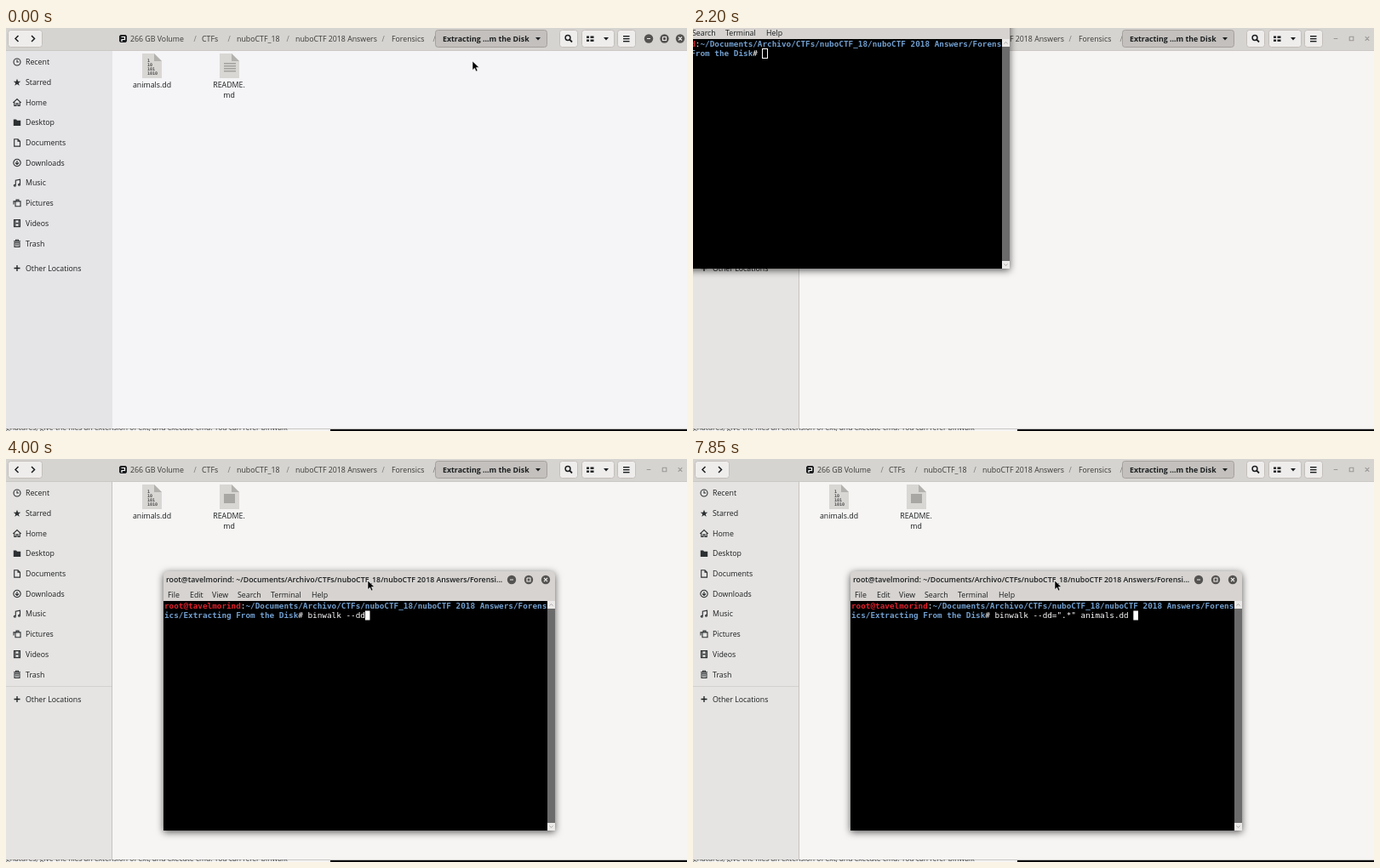
An HTML page with a canvas for the animation above (8000 ms loop, 800 by 474 pixels).

```html
<!DOCTYPE html>
<html lang="en">
<head>
<meta charset="utf-8">
<title>Opening a terminal from the file manager</title>
<style>
  html, body { margin: 0; width: 100%; height: 100%; overflow: hidden; background: #f6f5f4; }
  canvas { display: block; }
</style>
</head>
<body>
<canvas id="stage" width="800" height="474"></canvas>
<script>
const ctx = document.getElementById('stage').getContext('2d');
const LOOP = 8000;
const UI = '"Open Sans", "Noto Sans", sans-serif';
const MONO = '"DejaVu Sans Mono", monospace';
const INK = '#1b1e1f';

const PLACE = ['nuboCTF_18', 'nuboCTF 2018 Answers'];
const USER = 'root@tavelmorind';
const PATH = `~/Documents/Archivo/CTFs/${PLACE.join('/')}/Forens`;

// Tracks are [time, x, y]
const POINTER = [[400, 548, 39], [850, 495, 161], [1150, 495, 161], [1350, 531, 220],
                 [1450, 535, 240], [1550, 535, 240], [1850, 151, -14]];
const DRAG = [[2200, -273, -154], [2300, -12, -1], [2400, 0, 0]];
const SETTLED = 100, MENU_OPEN = 1000, MENU_CLOSE = 1500, TERM_OPEN = 1600, FOCUS = 2500;

// Keystrokes; "<" is backspace
const KEYS = [[2750, 'b'], [2850, 'i'], [2900, 'n'], [3000, 'w'], [3100, 'a'], [3200, 'l'],
  [3300, 'k'], [3350, ' '], [3500, '-'], [3600, '-'], [3650, 'd'], [3750, 'd'], [4400, '='],
  [4900, '.'], [5150, '*'], [5600, '<'], [5750, '<'], [6000, '"'], [6400, '.'], [6600, '*'],
  [6800, '"'], [7000, ' '], [7200, 'a'], [7400, 'n'], [7700, 'i'], [7850, 'mals.dd ']];

const SIDEBAR = [
  ['Recent', 'M9 5a4 4 0 1 1-8 0a4 4 0 1 1 8 0M5 2.5V5H7'],
  ['Starred', 'M5 1L6.2 4H9.3L6.8 6L7.7 9L5 7.2L2.3 9L3.2 6L.7 4H3.8Z', true],
  ['Home', 'M.3 5.5L5 1.2L9.7 5.5M1.8 4.5V9H4V6.3H6V9H8.2V4.5'],
  ['Desktop', 'M.8 1.5H4L5 2.7H9.2V8.8H.8Z', true],
  ['Documents', 'M1.7 1H6L8.5 3.5V9.3H1.7ZM6 1V3.5H8.5'],
  ['Downloads', 'M9.2 5a4.2 4.2 0 1 1-8.4 0a4.2 4.2 0 1 1 8.4 0M5 2.5V7M3 5L5 7L7 5'],
  ['Music', 'M3.3 8V2L8.5 1V7M3.3 8a1 1 0 1 1-2 0a1 1 0 1 1 2 0M8.5 7a1 1 0 1 1-2 0a1 1 0 1 1 2 0'],
  ['Pictures', 'M3 3H9V8.8H3ZM1 6.5V3H3M4 3V1.2H7V3'],
  ['Videos', 'M1.5 1H8.5V9H1.5ZM3 1V9M7 1V9M3 5H7'],
  ['Trash', 'M1 2.5H9M3.5 2.5V1H6.5V2.5M2 4H8V9.2H2ZM4 5V8M6 5V8']
].map(([label, d, solid]) => [label, new Path2D(d), solid]);

const MENU = [['New Folder', 'Shift+Ctrl+N'], ['Paste', 'Ctrl+V'], ['Select All', 'Ctrl+A'],
              ['Properties', ''], ['Open in Terminal', '']];

function rect(x, y, w, h, color) {
  ctx.fillStyle = color;
  ctx.fillRect(x, y, w, h);
}

function box(x, y, w, h, fill, border, radius = 3) {
  ctx.beginPath();
  ctx.roundRect(x + .5, y + .5, w - 1, h - 1, radius);
  ctx.fillStyle = fill;
  ctx.fill();
  stroke(border);
}

function stroke(color, width = 1, path) {
  ctx.strokeStyle = color;
  ctx.lineWidth = width;
  path ? ctx.stroke(path) : ctx.stroke();
}

function lines(color, width, ...polylines) {
  ctx.beginPath();
  for (const [start, ...rest] of polylines) {
    ctx.moveTo(...start);
    rest.forEach(p => ctx.lineTo(...p));
  }
  stroke(color, width);
}

function polygon(color, ...points) {
  ctx.beginPath();
  points.forEach(p => ctx.lineTo(...p));
  ctx.closePath();
  ctx.fillStyle = color;
  ctx.fill();
}

function disc(x, y, r, color) {
  ctx.beginPath();
  ctx.arc(x, y, r, 0, 7);
  ctx.fillStyle = color;
  ctx.fill();
}

function text(s, x, y, { color = INK, size = 8.8, weight = 500, align = 'left', family = UI } = {}) {
  ctx.font = `${weight} ${size}px ${family}`;
  ctx.fillStyle = color;
  ctx.textAlign = align;
  ctx.fillText(s, x, y);
}

function follow(track, t) {
  const next = track.findIndex(k => k[0] > t);
  if (next === 0) return track[0].slice(1);
  if (next < 0) return track[track.length - 1].slice(1);
  const [t0, x0, y0] = track[next - 1], [t1, x1, y1] = track[next];
  const u = (t - t0) / (t1 - t0), e = u * u * (3 - 2 * u);
  return [x0 + (x1 - x0) * e, y0 + (y1 - y0) * e];
}

function controls(xs, y, active) {
  const color = active ? '#eeecea' : '#9a9896', r = active ? 2 : 2.3;
  if (active) xs.forEach(x => disc(x, y, 5.2, '#555351'));
  const [a, b, c] = xs;
  lines(color, 1.1, [[a - r, y], [a + r, y]],
    [[b - r, y - r], [b + r, y - r], [b + r, y + r], [b - r, y + r], [b - r, y - r]],
    [[c - r, y - r], [c + r, y + r]], [[c + r, y - r], [c - r, y + r]]);
}

function downArrow(x, y) {
  polygon(INK, [x - 3, y - 1.5], [x + 3, y - 1.5], [x, y + 2]);
}

function header(active) {
  rect(0, 0, 800, 26, '#d6d4d1');
  rect(0, 26, 800, 1, '#cbc8c5');
  const face = '#efedec', edge = '#c3bfbb';
  box(2, 2, 41, 21, face, edge);
  lines(INK, 1.5, [[14.5, 9], [11, 12.5], [14.5, 16]], [[30, 9], [33.5, 12.5], [30, 16]]);

  box(133, 8, 9, 9, INK, INK, 1.5);
  lines('#fff', 1.2, [[135.5, 10.5], [139.5, 10.5], [139.5, 13.5], [136, 13.5], [136, 16]]);
  const crumbs = [['266 GB Volume', 146], ['CTFs', 230], [PLACE[0], 271], [PLACE[1], 340], ['Forensics', 453]];
  crumbs.forEach(([s, x]) => text(s, x, 16, { color: '#3a3937' }));
  [222, 262, 331, 443, 503].forEach(x => text('/', x, 16, { color: '#7b7977', align: 'center' }));
  box(504, 2, 132, 21, '#c3c0bd', '#a5a19d');
  text('Extracting ...m the Disk', 513, 16, { weight: 700 });
  downArrow(625, 12.5);

  box(650, 2, 22, 21, face, edge);
  ctx.beginPath();
  ctx.arc(660, 11.5, 2.9, 0, 7);
  stroke(INK, 1.5);
  lines(INK, 1.8, [[662, 13.5], [665, 16.5]]);
  box(676, 2, 39, 21, face, edge);
  for (const y of [9.5, 13.5]) {
    rect(682, y, 3, 2.4, INK);
    rect(686.5, y, 4, 2.4, INK);
  }
  downArrow(705, 12.5);
  box(718, 2, 22, 21, face, edge);
  [9, 12, 15].forEach(y => rect(725, y, 7.5, 1.4, INK));
  controls([755, 773.5, 792], 12.5, active);
}

function fileIcon(x, y) {
  polygon('#d9d7d4', [x, y], [x + 14, y], [x + 23, y + 9], [x + 23, y + 29], [x, y + 29]);
  polygon('#b3b1ae', [x + 14, y], [x + 23, y + 9], [x + 14, y + 9]);
}

function fileManager(t) {
  const settled = t >= SETTLED;
  rect(0, 0, 800, 474, settled ? '#f6f5f4' : '#f5f4f6');
  rect(0, 26, 125, 445, settled ? '#e5e4e2' : '#e5e4e6');
  if (settled) {
    rect(124, 26, 1, 445, '#c6c3c0');
    rect(0, 267, 124, 1, '#d3d1ce');
  }

  SIDEBAR.forEach(([label, icon, solid], i) => {
    const y = 40 + i * 23.7;
    ctx.save();
    ctx.translate(8, y - 5);
    ctx.fillStyle = '#2c3032';
    solid ? ctx.fill(icon) : stroke('#2c3032', 1.1, icon);
    ctx.restore();
    text(label, 23, y + 3.2);
  });
  lines(INK, 1.3, [[9.5, 282.5], [16.5, 282.5]], [[13, 279], [13, 286]]);
  text('Other Locations', 23, 285.7);

  fileIcon(160, 30);
  ['1', '10', '101', '1010'].forEach((s, i) =>
    text(s, 166, 40 + i * 5, { size: 5, weight: 700, family: MONO, color: '#4b4b4b' }));
  text('animals.dd', 171.5, 70, { align: 'center' });
  fileIcon(251, 30);
  if (!settled) [41, 44, 47, 50].forEach(y => rect(256, y, 14, 1.5, '#a3a19e'));
  else rect(256, 41, 13, 11, '#a9a7a4');
  text('README.', 262, 70, { align: 'center' });
  text('md', 262, 81.5, { align: 'center' });

  header(t < TERM_OPEN);
  backdropStrip();
}

function backdropStrip() {
  ctx.save();
  ctx.beginPath();
  ctx.rect(0, 471, 800, 3);
  ctx.clip();
  rect(0, 471, 381, 3, '#f4f4f4');
  rect(381, 471, 419, 3, '#08080c');
  rect(0, 471, 800, 1, '#c9c7c4');
  text('gnatures, give the files an extension of ext, and execute cmd. You can refer binwalk',
    0, 473, { size: 8.6, color: '#444' });
  ctx.restore();
}

function contextMenu(pointerY, hovering) {
  box(494, 161, 163, 90, '#f9f9f8', '#c9c7c4', 0);
  MENU.forEach(([label, keys], i) => {
    const top = 162.5 + i * 17.5, off = label === 'Paste';
    const hot = hovering && !off && pointerY >= top && pointerY < top + 17.5;
    if (i === 1 || i === 2) rect(495, Math.round(top - 1), 161, 1, '#dfddda');
    if (hot) rect(495, Math.round(top), 162, 17, '#2494c6');
    text(label, 513, top + 12, { color: hot ? '#fff' : off ? '#a09e9c' : INK });
    text(keys, 651, top + 12, { color: off ? '#bbb9b7' : '#8b8987', align: 'right' });
  });
}

function typed(t) {
  return KEYS.filter(k => k[0] <= t)
    .reduce((s, [, key]) => key === '<' ? s.slice(0, -1) : s + key, '');
}

function terminal(t, dx, dy) {
  ctx.save();
  ctx.translate(Math.round(dx), Math.round(dy));
  ctx.save();
  ctx.shadowColor = 'rgba(0,0,0,.65)';
  ctx.shadowBlur = 9;
  ctx.shadowOffsetY = 2;
  ctx.beginPath();
  ctx.roundRect(185, 132, 460, 305, [5, 5, 0, 0]);
  ctx.fillStyle = '#d6d3d0';
  ctx.fill();
  ctx.restore();

  text(`${USER}: ${PATH}i...`, 188, 145.3, { weight: 600 });
  controls([594, 614, 634], 142, true);
  const items = [['File', 190], ['Edit', 216], ['View', 242], ['Search', 272], ['Terminal', 311], ['Help', 359]];
  items.forEach(([s, x]) => text(s, x, 162.7));

  rect(185, 167, 451, 270, '#000');
  rect(636, 167, 9, 270, '#6b6b6b');
  for (const [y, tip] of [[167, -1], [428, 1]]) {
    rect(636, y, 9, 9, '#eceae8');
    lines('#a9a7a5', 1, [[638.5, y + 4.5 - tip], [640.5, y + 4.5 + tip], [642.5, y + 4.5 - tip]]);
  }

  const size = 9.33;
  ctx.font = `${size}px ${MONO}`;
  const cell = ctx.measureText('0').width;
  const put = (s, col, row, color, weight = 700) =>
    text(s, 186 + col * cell, 176 + row * 11, { size, weight, color, family: MONO });
  const folder = 'ics/Extracting From the Disk', command = typed(t);
  put(USER, 0, 0, '#e0202c');
  put(':', USER.length, 0, '#eee', 400);
  put(PATH, USER.length + 1, 0, '#729fcf');
  put(folder, 0, 1, '#729fcf');
  put('# ' + command, folder.length, 1, '#fff', 400);

  const x = 186 + (folder.length + 2 + command.length) * cell;
  if (t >= FOCUS) rect(x, 178.5, cell, 11, '#fff');
  else {
    ctx.strokeStyle = '#fff';
    ctx.lineWidth = 1;
    ctx.strokeRect(Math.round(x) + .5, 178.5, 6, 11);
  }
  ctx.restore();
}

function arrow(x, y) {
  const shape = [[0, 0], [0, 10.5], [2.5, 8.2], [4.2, 12], [6, 11.2], [4.4, 7.6], [7.8, 7.4]]
    .map(([a, b]) => [x + a, y + b]);
  polygon('#000', ...shape);
  stroke('rgba(255,255,255,.8)', .7);
}

function fist(x, y) {
  ctx.beginPath();
  ctx.roundRect(x - 4, y - 3, 8, 6, 2.5);
  ctx.fillStyle = '#111';
  ctx.fill();
}

function draw(t) {
  const [wx, wy] = follow(DRAG, t);
  const dragging = t >= 2200 && t < FOCUS;
  const [px, py] = t < 2200 ? follow(POINTER, t) : [425 + wx, 143 + wy];
  fileManager(t);
  if (t >= MENU_OPEN && t < MENU_CLOSE) contextMenu(py, t >= 1150);
  if (t >= TERM_OPEN) terminal(t, wx, wy);
  dragging ? fist(px - 4, py - 1) : arrow(px, py);
}

function frame() {
  draw(performance.now() % LOOP);
  requestAnimationFrame(frame);
}
frame();
</script>
</body>
</html>
```
